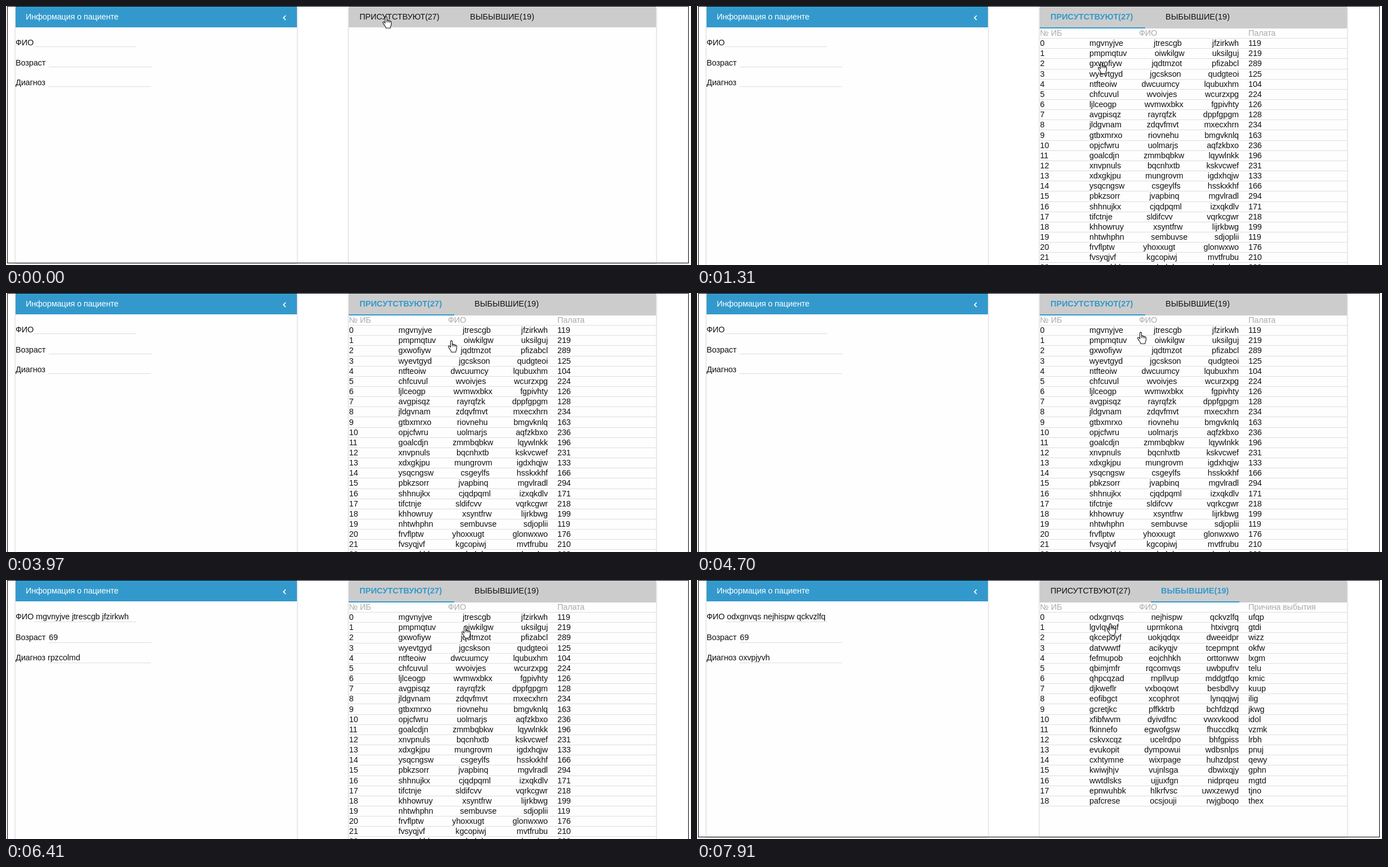
An HTML page that plays this animation: 1215 px wide and 461 px high, repeating every 8000 ms.

```html
<!DOCTYPE html>
<html lang="ru">
<head>
<meta charset="utf-8">
<title>Информация о пациенте</title>
<style>
  html, body { margin: 0; width: 100%; height: 100%; overflow: hidden; background: #fff; }
  #stage {
    position: relative; width: 1215px; height: 461px; overflow: hidden;
    font: 14.4px/18px "Liberation Sans", Arial, sans-serif;
    letter-spacing: -.1px; color: #111; white-space: pre;
  }
  #stage * { position: absolute; box-sizing: border-box; }
  #frame { left: 2px; top: 0; width: 1209px; height: 458px; border: 1px solid #000; }
  .panel { top: 1px; height: 456px; background: #fefefe; box-shadow: 0 1px 3px rgba(0, 0, 0, .3); }
  .long #frame, .long .panel { height: 520px; }
  #info { left: 17px; width: 499px; }
  #list { left: 608px; width: 545px; }
  .bar { left: 0; top: 0; width: 100%; height: 37px; line-height: 37px; }
  #info .bar { background: #39c; color: #fff; padding-left: 18px; }
  #list .bar { background: #ccc; }
  .open #list .bar { height: 39px; }
  #chevron { left: 472px; top: 13px; width: 10px; height: 14px; }

  .tab { top: 0; }
  #tab1 { left: 19px; }
  #tab2 { left: 215px; letter-spacing: .1px; }
  .tab.on { font-weight: bold; letter-spacing: .1px; color: #39c; }
  .first #tab2 { left: 223px; }
  #underline { top: 37px; height: 2px; background: #39c; display: none; }
  .first #underline { display: block; left: 0; width: 187px; }
  .second #underline { display: block; left: 197px; width: 157px; }

  .field { left: 0; }
  .field u { text-decoration: none; top: 0; height: 17px; width: 182px; border-bottom: 1px solid #ddd; }
  .field i { font-style: normal; top: 0; }

  .table { left: 0; top: 39px; width: 545px; display: none; }
  .first #present, .second #gone { display: block; }
  .row { left: 0; width: 100%; height: 18.15px; line-height: 17.2px; border-bottom: 1px solid #ddd; }
  .row.hit { background: #ccc; }
  .row b { font-weight: normal; top: 0; left: .5px; }
  .row .name { left: 88px; width: 265px; display: flex; justify-content: space-between; }
  #stage .name span { position: static; }
  .row .last { left: 370px; }
  .head { color: #aaa; }
  .head .title { left: 176px; }

  #hand { left: 0; top: 0; width: 17px; height: 23px; }
</style>
</head>
<body>
<div id="stage">
  <div id="frame"></div>
  <div id="info" class="panel">
    <div class="bar">Информация о пациенте</div>
    <svg id="chevron" viewBox="0 0 10 14"><path d="M7 3 3.2 7 7 11" fill="none" stroke="#fff" stroke-width="1.8"/></svg>
  </div>
  <div id="list" class="panel">
    <div class="bar">
      <div id="tab1" class="tab">ПРИСУТСТВУЮТ(27)</div>
      <div id="tab2" class="tab">ВЫБЫВШИЕ(19)</div>
      <div id="underline"></div>
    </div>
    <div id="present" class="table"></div>
    <div id="gone" class="table"></div>
  </div>
  <svg id="hand" viewBox="0 0 17 23">
    <path d="M4.5 2.2C4.5.4 7.5.4 7.5 2.2V7.6C8 6.9 10 6.9 10.2 8.2 10.8 7.6 12.6 7.8 12.8 9 13.6 8.6 15.4 8.8 15.4 10.6V14.5C15.4 17 13.8 18 13.8 21.3H6C6 19 3.5 16.5 2.2 14.4 1.4 13 .4 11.8.6 10.8 1 9.6 2.6 9.8 3.4 11L4.5 12.4Z" fill="#fff" stroke="#111" stroke-width="1.1"/>
    <path d="M7.5 7.6V11.2M10.2 8.2V11.5M12.8 9V11.8" stroke="#111" stroke-width="1"/>
  </svg>
</div>
<script>
const LOOP = 8000, OPEN = 150, PICK = 5130, RELEASE = 5270, SWITCH = 7290;
const $ = id => document.getElementById(id);

const present = `mgvnyjve jtrescgb jfzirkwh 119
pmpmqtuv oiwkilgw uksilguj 219
gxwofiyw jqdtmzot pfizabcl 289
wyevtgyd jgcskson qudgteoi 125
ntfteoiw dwcuumcy lqubuxhm 104
chfcuvul wvoivjes wcurzxpg 224
ljlceogp wvmwxbkx fgpivhty 126
avgpisqz rayrqfzk dppfgpgm 128
jldgvnam zdqvfmvt mxecxhrn 234
gtbxmrxo riovnehu bmgvknlq 163
opjcfwru uolmarjs aqfzkbxo 236
goalcdjn zmmbqbkw lqywlnkk 196
xnvpnuls bqcnhxtb kskvcwef 231
xdxgkjpu mungrovm igdxhqjw 133
ysqcngsw csgeylfs hsskxkhf 166
pbkzsorr jvapbinq mgvlradl 294
shhnujkx cjqdpqml izxqkdlv 171
tifctnje sldifcvv vqrkcgwr 218
khhowruy xsyntfrw lijrkbwg 199
nhtwhphn sembuvse sdjoplii 119
frvflptw yhoxxugt glonwxwo 176
fvsyqjvf kgcopiwj mvtfrubu 210
avmwkbhx cxhukdve sohuaduv 203`;

const gone = `odxgnvqs nejhispw qckvzlfq ufqp
lgvlqvmf uprmkona htxivgrq gtdi
qkcepoyf uokjqdqx dweeidpr wizz
datvwwtf acikyqjv tcepmpnt okfw
fefmupob eojchhkh orttonww lxgm
qbimjmfr rqcomvqs uwbpufrv telu
qhpcqzad rnpllvup mddgtfqo kmic
djkweflr vxboqowt besbdlvy kuup
eofibgct xcophrot lynqqjwj ilig
gcretjkc pffkktrb bchfdzqd jkwg
xfibfwvm dyivdfnc vwxvkood idol
fkinnefo egwofgsw fhuccdkq vzmk
cskvxcqz ucelrdpo bhfgpiss lrbh
evukopit dympowui wdbsnlps pnuj
cxhtymne wixrpage huhzdpst qewy
kwiwjhjv vujnlsga dbwixqjy gphn
wwtdlsks ujjuxfgn nidprqeu mgtd
epnwuhbk hlkrfvsc uwxzewyd tjno
pafcrese ocsjouji rwjgboqo thex`;

function fillTable(table, data, lastTitle) {
  const row = (i, cls, cells) =>
    `<div class="row ${cls}" style="top:${(i * 18.15).toFixed(2)}px">${cells}</div>`;
  table.innerHTML =
    row(0, 'head', `<b>№ ИБ</b><b class="title">ФИО</b><b class="last">${lastTitle}</b>`) +
    data.split('\n').map((line, i) => {
      const words = line.split(' ');
      const last = words.pop();
      const names = words.map(w => `<span>${w}</span>`).join('');
      return row(i + 1, '', `<b>${i}</b><div class="name">${names}</div><b class="last">${last}</b>`);
    }).join('');
}
fillTable($('present'), present, 'Палата');
fillTable($('gone'), gone, 'Причина выбытия');
const firstRow = $('present').children[1];

// Label, line start, value start
const fields = [['ФИО', 32, 36], ['Возраст', 59, 59], ['Диагноз', 58, 57]].map(([label, line, text]) => {
  const el = document.createElement('div');
  el.className = 'field';
  el.innerHTML = `${label}<u style="left:${line}px"></u><i style="left:${text}px"></i>`;
  $('info').append(el);
  return el;
});
const records = [
  ['', '', ''],
  ['mgvnyjve jtrescgb jfzirkwh', '69', 'rpzcolmd'],
  ['odxgnvqs nejhispw qckvzlfq', '69', 'oxvpjyvh']
];

function showRecord(n) {
  fields.forEach((el, i) => {
    el.style.top = 55 + Math.round(i * (n ? 36.5 : 35.5)) + 'px';
    el.querySelector('u').style.height = n ? '19px' : '17px';
    el.querySelector('i').textContent = records[n][i];
  });
}

// Pointer moves: start, interval, stops
const moves = [
  [0, 0, '668,18'],
  [580, 130, '672,26 678,35'],
  [1020, 145, '690,56 702,81 711,99'],
  [2210, 143, '724,111 744,129 766,146 785,157 801,166 809,170'],
  [3260, 142, '828,164 852,148 863,126 846,106 815,93 784,84 744,72 715,62'],
  [4390, 150, '760,58 817,53 781,69 749,65'],
  [5270, 142, '757,70 768,77 779,84 788,89 794,92 797,94'],
  [6260, 146, '800,90 808,82 820,70 835,54 849,38 860,25 866,18'],
  [7440, 155, '852,30 803,53 745,72 727,77']
].flatMap(([start, gap, stops]) =>
  stops.split(' ').map((p, i) => [start + i * gap, ...p.split(',')]));

let shown = '';
function draw() {
  const t = performance.now() % LOOP;
  const view = t < OPEN ? '' : t < SWITCH ? 'open long first' : 'open second';
  const record = t < PICK ? 0 : t < SWITCH ? 1 : 2;
  const hit = t >= PICK && t < RELEASE;
  const [, x, y] = moves.findLast(m => m[0] <= t);
  const key = [view, record, hit, x, y].join();
  if (key !== shown) {
    shown = key;
    $('stage').className = view;
    $('tab1').classList.toggle('on', view.includes('first'));
    $('tab2').classList.toggle('on', view.includes('second'));
    firstRow.classList.toggle('hit', hit);
    showRecord(record);
    $('hand').style.transform = `translate(${x}px, ${y}px)`;
  }
  requestAnimationFrame(draw);
}
draw();
</script>
</body>
</html>
```
